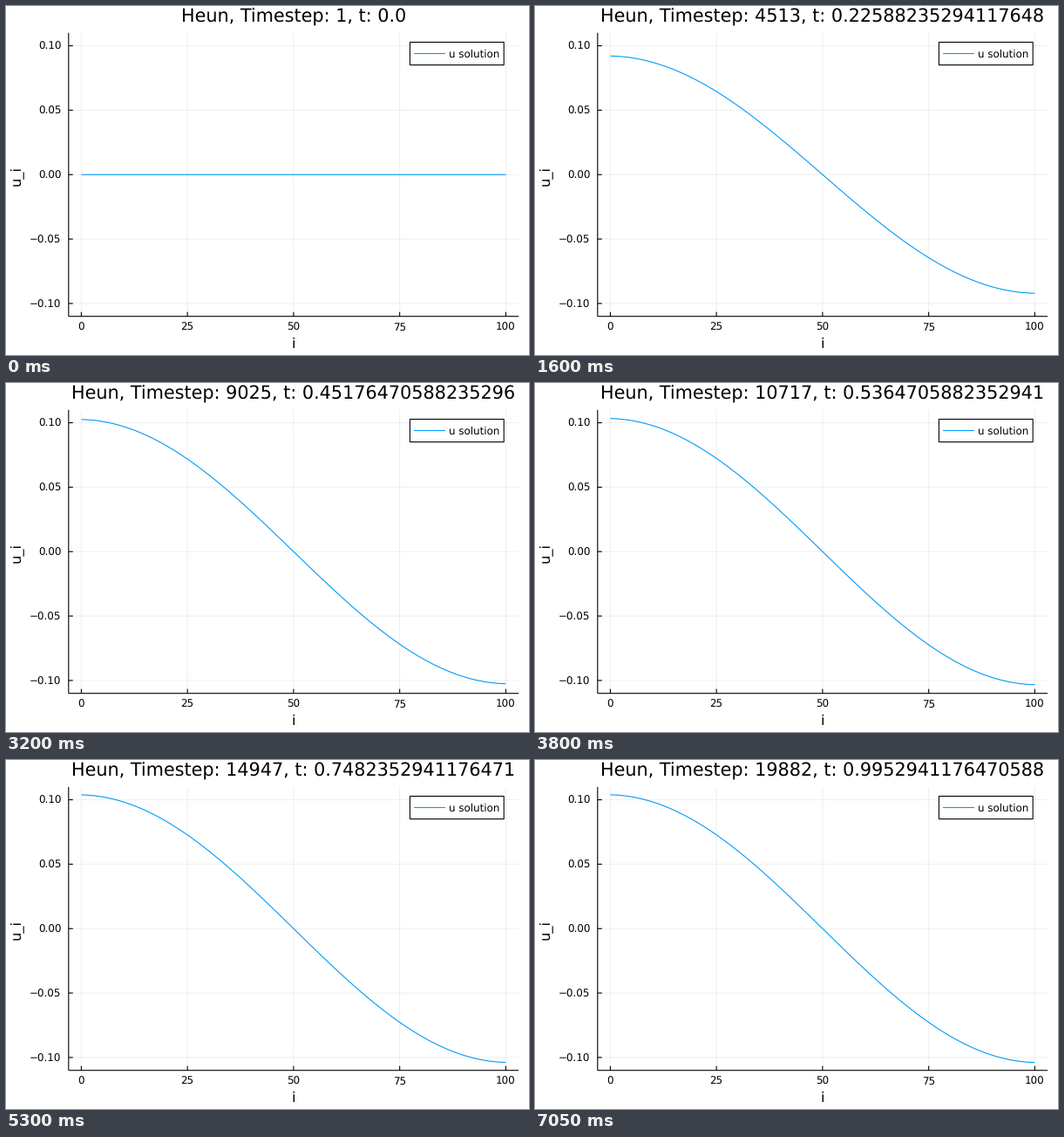
A matplotlib script that plays this animation: 600 px wide and 400 px high, repeating every 7.1 s.

```python
import numpy as np
import matplotlib.pyplot as plt
from matplotlib.animation import FuncAnimation
from matplotlib.patches import Rectangle

plt.rcParams.update({
    "font.family": "DejaVu Sans",
    "text.hinting": "none",
    "text.hinting_factor": 8,
    "lines.solid_capstyle": "butt",
    "path.snap": False,
})

W, H, DPI = 600, 400, 100
PX = 72 / DPI                      # one pixel in points
FRAMES, INTERVAL = 142, 50
LEFT, RIGHT, TOP, BOTTOM = 71.8, 588, 30.8, 355.7
BLUE = "#009afa"
SMALL, LABEL, TITLE = 11.86, 16.3, 20.75

STRIDE = 141                       # solver steps per picture
PEAK = 0.1039                      # steady amplitude
RATE = 1 / PEAK                    # decay rate of the slowest mode
LENGTH = np.pi * np.sqrt(PEAK)     # effective domain length of that mode

fig = plt.figure(figsize=(W / DPI, H / DPI), dpi=DPI, facecolor="white")
ax = fig.add_axes([0, 0, 1, 1])
ax.set(xlim=(0, W), ylim=(H, 0))
ax.axis("off")


def px(i):
    return LEFT + (i + 3) / 106 * (RIGHT - LEFT)


def py(u):
    return (TOP + BOTTOM) / 2 - u / 0.22 * (BOTTOM - TOP)


def line(xs, ys, color="black", width=1.1, **kw):
    return ax.plot(xs, ys, color=color, lw=width * PX, **kw)[0]


def text(x, y, s, size, ha="center", **kw):
    return ax.text(x, y, s, fontsize=size * PX, ha=ha, va="baseline", **kw)


for i in (0, 25, 50, 75, 100):
    x = px(i)
    line([x, x], [TOP, BOTTOM], alpha=0.06)
    line([x, x], [BOTTOM, BOTTOM - 5])
    text(x, 372, str(i), SMALL)

for u in (-0.10, -0.05, 0.0, 0.05, 0.10):
    y = py(u)
    line([LEFT, RIGHT], [y, y], alpha=0.06)
    line([LEFT, LEFT + 5], [y, y])
    text(63.5, y + 4.5, f"{u:.2f}".replace("-", "\u2212"), SMALL, ha="right")

line([LEFT, LEFT], [TOP, BOTTOM])
line([LEFT, RIGHT], [BOTTOM, BOTTOM])
text(330, 392, "i", LABEL)
text(16, 194.3, "u_i", LABEL, rotation=90, rotation_mode="anchor")

grid = np.arange(101)
mode = np.sin(np.pi * (0.5 - grid / 100) / LENGTH)
curve = line(px(grid), py(0 * mode), BLUE, zorder=3)

ax.add_patch(Rectangle((463.4, 41.5), 107.8, 26.1, fc="white", ec="black",
                       lw=1.1 * PX, zorder=4))
line([468, 504], [54.5, 54.5], BLUE, zorder=5)
text(508, 59, "u solution", SMALL, ha="left", zorder=5)

title = text(329.7, 18.6, "", TITLE)


def update(k):
    t = 6 * k / 850
    curve.set_ydata(py(PEAK * (1 - np.exp(-RATE * t)) * mode))
    title.set_text(f"Heun, Timestep: {1 + STRIDE * k}, t: {t}")
    return curve, title


anim = FuncAnimation(fig, update, frames=FRAMES, interval=INTERVAL,
                     repeat=True, repeat_delay=0)
plt.show()
```
